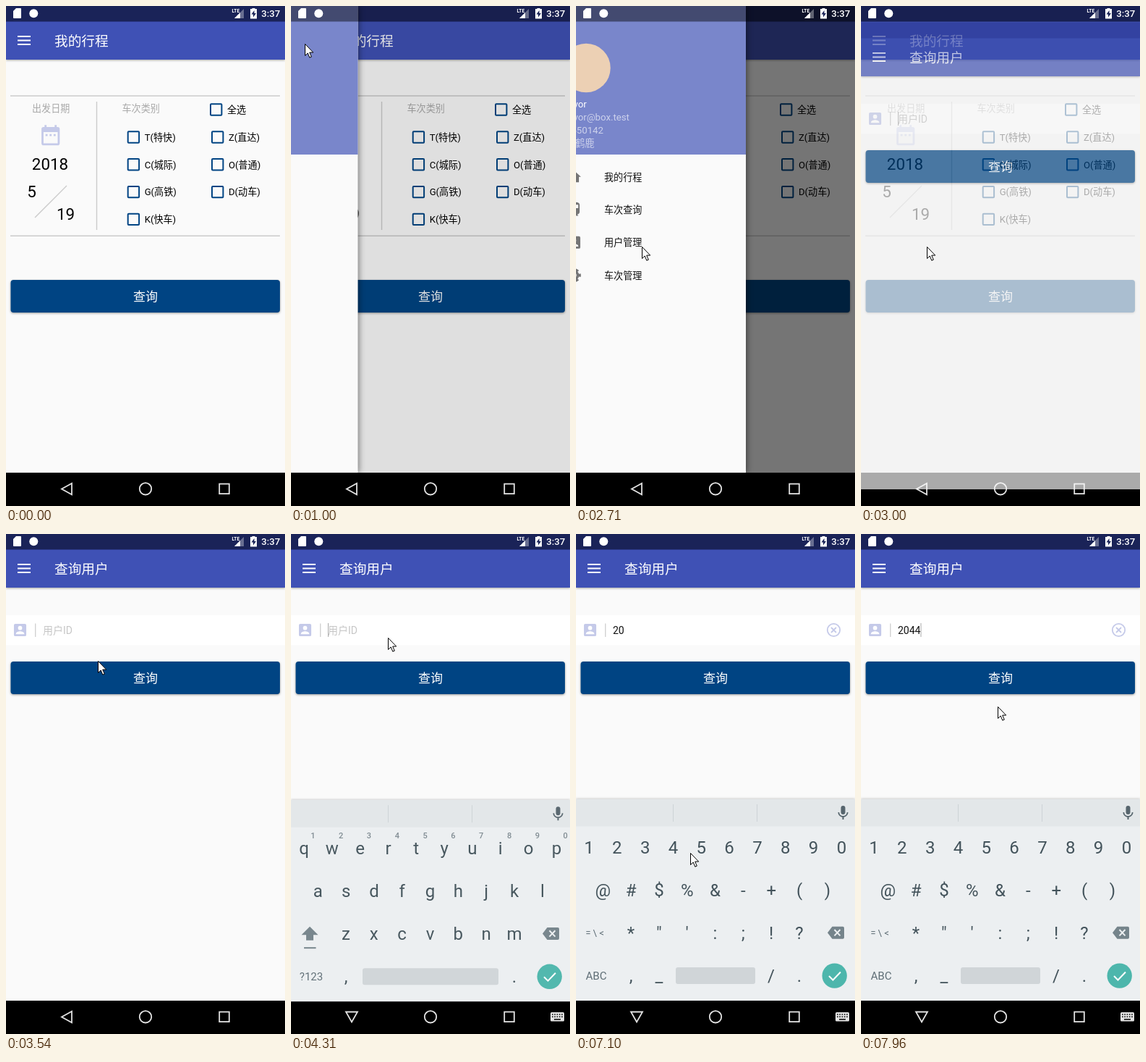
An HTML page that plays this animation: 386 px wide and 690 px high, repeating every 8 s.

```html
<!DOCTYPE html>
<html lang="zh-CN">
<head>
<meta charset="utf-8">
<style>
html, body { margin: 0; width: 100%; height: 100%; overflow: hidden; background: #000; }
svg { display: block; font-family: Roboto, "Noto Sans CJK SC", "Noto Sans CJK", "Noto Sans", sans-serif; }
.bar { filter: drop-shadow(0 1.5px 1.5px rgba(0,0,0,.35)); }
.btn { filter: drop-shadow(0 1px 1.5px rgba(0,0,0,.4)); }
.side { filter: drop-shadow(1px 0 4px rgba(0,0,0,.5)); }
.board { filter: drop-shadow(0 -1px 1.5px rgba(0,0,0,.18)); }
</style>
</head>
<body>
<script>
const esc = s => s.replace(/&/g, '&amp;').replace(/</g, '&lt;');
const text = (x, y, size, s, fill = '#000', anchor = 'start', extra = '') =>
  `<text x="${x}" y="${y}" font-size="${size}" fill="${fill}" text-anchor="${anchor}" ${extra}>${esc(s)}</text>`;
const mid = (x, y, size, s, fill, extra) => text(x, y, size, s, fill, 'middle', extra);
const rect = (x, y, w, h, fill, extra = '') =>
  `<rect x="${x}" y="${y}" width="${w}" height="${h}" fill="${fill}" ${extra}/>`;
const line = (d, stroke, width, extra = '') =>
  `<path d="${d}" fill="none" stroke="${stroke}" stroke-width="${width}" ${extra}/>`;
const group = (id, body, extra = '') => `<g id="${id}" ${extra}>${body}</g>`;
// 24-unit icon centred on a point
const icon = (cx, cy, scale, fill, body) =>
  `<g transform="translate(${cx} ${cy}) scale(${scale}) translate(-12 -12)" fill="${fill}">${body}</g>`;
const path = d => `<path d="${d}"/>`;

const ICONS = {
  home: path('M10 20v-6h4v6h5v-8h3L12 3 2 12h3v8z'),
  train: path('M4 15.5C4 17.43 5.57 19 7.5 19L6 20.5v.5h12v-.5L16.5 19c1.93 0 3.5-1.57 3.5-3.5V5c0-3.5-3.58-4-8-4s-8 .5-8 4v10.5zm8 1.5a2 2 0 1 1 0-4 2 2 0 0 1 0 4zm6-7H6V5h12v5z'),
  user: path('M3 5v14a2 2 0 0 0 2 2h14a2 2 0 0 0 2-2V5a2 2 0 0 0-2-2H5a2 2 0 0 0-2 2zm12 4a3 3 0 1 1-6 0 3 3 0 0 1 6 0zm-9 8c0-2 4-3.1 6-3.1s6 1.1 6 3.1v1H6v-1z'),
  gear: `<g fill="none" stroke="#757575"><circle cx="12" cy="12" r="5.4" stroke-width="3.8"/>
    <circle cx="12" cy="12" r="8.2" stroke-width="3.4" pathLength="12" stroke-dasharray="1" stroke-dashoffset=".5"/></g>`,
  date: path('M9 11H7v2h2zm4 0h-2v2h2zm4 0h-2v2h2zm2-7h-1V2h-2v2H8V2H6v2H5a2 2 0 0 0-2 2v14a2 2 0 0 0 2 2h14a2 2 0 0 0 2-2V6a2 2 0 0 0-2-2zm0 16H5V9h14z'),
  mic: path('M12 14a3 3 0 0 0 3-3V5a3 3 0 0 0-6 0v6a3 3 0 0 0 3 3zm5.3-3c0 3-2.54 5.1-5.3 5.1S6.7 14 6.7 11H5c0 3.41 2.72 6.23 6 6.72V21h2v-3.28c3.28-.48 6-3.3 6-6.72z'),
};

const PALE = '#c5cae9', RULE = '#cbcbcb', NAVY = '#004483', KEY = '#43535b', GREY = '#75848b';

const frame = title =>
  rect(0, 0, 386, 644, '#fafafa') +
  rect(0, 21, 386, 53, '#3f51b5', 'class="bar"') + rect(0, 0, 386, 21.5, '#303f9f') +
  line('M16 42h18M16 47.5h18M16 53h18', '#fff', 1.9) + text(67, 54.5, 18.7, title, '#fff');
const button = y =>
  rect(6.5, y, 372.5, 45, NAVY, 'rx="4" class="btn"') + mid(193, y + 29, 17, '查询', '#fff');
const check = (x, y, label) =>
  rect(x, y - 7.7, 15.4, 15.4, 'none', `rx="1" stroke="${NAVY}" stroke-width="2"`) +
  text(x + 23, y + 4.8, 13.1, label);

const tripPage = () => {
  const types = ['T(特快)', 'Z(直达)', 'C(城际)', 'O(普通)', 'G(高铁)', 'D(动车)', 'K(快车)'];
  return frame('我的行程') +
    line('M6 124H379M6 317.3H379M125.5 132V309M40 292L84 248', RULE, 1.4) +
    text(36, 145.8, 13.1, '出发日期', '#a9a9a9') + text(160.5, 145.8, 13.1, '车次类别', '#a9a9a9') +
    icon(61.7, 178.2, 1.4, PALE, ICONS.date) +
    mid(61, 226, 22.4, '2018') + text(29.3, 264.3, 22.4, '5') + text(70, 295.3, 22.4, '19') +
    check(283, 143, '全选') +
    types.map((s, i) => check(i % 2 ? 285 : 168.7, 181 + 37.8 * (i >> 1), s)).join('') +
    button(378);
};

const userPage = () => frame('查询用户') +
  rect(0, 112, 386, 41.5, '#fff') + icon(19.5, 132.5, .95, PALE, ICONS.user) +
  line('M40.7 123.5v18.5', '#cfcfcf', 1.3) +
  text(51, 138, 14, '', '#000', 'start', 'id="entry"') +
  rect(51, 123, 1, 19, '#aaa', 'id="caret"') +
  group('clear', `<circle cx="356.5" cy="132.5" r="8.7" fill="none" stroke="${PALE}" stroke-width="1.8"/>` +
    line('M353 129l7 7m0-7l-7 7', PALE, 1.8)) +
  button(176);

const drawer = () => {
  const items = [['home', '我的行程'], ['train', '车次查询'], ['user', '用户管理'], ['gear', '车次管理']];
  return rect(0, 0, 263, 644, '#fafafa', 'class="side"') + rect(0, 0, 263, 205, '#7986cb') +
    '<circle cx="42" cy="85.5" r="33.7" fill="#ecd0b4"/>' +
    ['nivor', 'nivor@box.test', '5550142', '松鹤鹿'].map((s, i) =>
      text(14, 140 + 18 * i, 13.2, s, i ? '#cdd2ec' : '#fff')).join('') +
    items.map(([name, s], i) => icon(25.4, 235.7 + 45.3 * i, .95, '#757575', ICONS[name]) +
      text(67, 240.6 + 45.3 * i, 13.1, s, '#111')).join('');
};

const row = (chars, x, r) => [...chars].map((c, i) =>
  mid(x + 38.82 * i, 440.5 + 59.2 * r, 24, c, KEY)).join('');
const space = (x, w) => rect(x, 598, w, 23, '#d0d5d8', 'rx="3"');

const letters = () =>
  row('qwertyuiop', 18, 0) + row('asdfghjkl', 37.3, 1) + row('zxcvbnm', 76, 2) +
  [...'1234567890'].map((c, i) => mid(30.3 + 38.82 * i, 419, 11, c, '#7d8990', 'font-weight="500"')).join('') +
  `<path d="M26 540.5L37.5 552H31v7.5H21V552H14.5z" fill="${GREY}"/>` + rect(18, 569, 16.5, 2, GREY) +
  mid(28, 615, 15, '?123', '#5f6e76') + space(99, 188);
const symbols = () =>
  row('1234567890', 18, 0) + row('@#$%&-+()', 37.3, 1) + row('*"\':;!?', 76, 2) +
  mid(115, 618, 24, '_', KEY) + mid(270, 618, 24, '/', KEY) +
  mid(26, 555, 13, '= \\ <', '#5f6e76') + mid(28, 615, 15, 'ABC', '#5f6e76') + space(138, 110);

const keyboard = () =>
  rect(0, 366, 386, 278, '#eceff1', 'class="board"') + rect(0, 366, 386, 37.5, '#e3e7e9') +
  line('M134.5 373v24M250.5 373v24', '#cdd3d6', 1) + icon(369.5, 385, 1, '#56656d', ICONS.mic) +
  group('letters', letters()) + group('symbols', symbols()) +
  mid(76, 618, 24, ',', KEY) + mid(309, 618, 24, '.', KEY) +
  `<path d="M348 550.2l6.5-8.5H369a2 2 0 0 1 2 2v13a2 2 0 0 1-2 2H354.500z" fill="${GREY}"/>` +
  line('M357.500 546l8 8.400m0-8.400l-8 8.400', '#eceff1', 2) +
  '<circle cx="357.700" cy="609.600" r="17.200" fill="#4db6ac"/>' + line('M350 610l5.500 5.500 10.500-11', '#fff', 2);

const navBar = () => rect(0, 644, 386, 46, '#000') +
  group('back', line('M91 658.700V674.300L77 666.500z', '#e2e2e2', 1.8)) +
  group('hide', line('M76 659.500H92L84 673.500z', '#e2e2e2', 1.8) +
    rect(359, 660, 19, 12.5, '#e2e2e2', 'rx="1.500"') +
    line('M361 663h15M361 666.300h15', '#000', 1.6, 'stroke-dasharray="1.600 1.700"') + line('M364 669.800h9', '#000', 1.5)) +
  '<circle cx="193" cy="666.300" r="8.200" fill="none" stroke="#e2e2e2" stroke-width="1.800"/>' +
  rect(295.2, 659.5, 13.6, 13.6, 'none', 'stroke="#e2e2e2" stroke-width="1.800"');

const statusBar = () => rect(0, 0, 386, 21.5, '#000', 'opacity=".45"') +
  '<path d="M14 3h6a1 1 0 0 1 1 1v12a1 1 0 0 1-1 1H11a1 1 0 0 1-1-1V7z" fill="#fff"/>' +
  '<circle cx="38.300" cy="10.300" r="6" fill="#fff"/>' +
  text(312.5, 9, 6.5, 'LTE', '#fff', 'start', 'font-weight="700"') +
  '<path d="M329 4v13H316z" fill="#fff" opacity=".35"/><path d="M324 9v8H316z" fill="#fff"/>' +
  '<path d="M340.500 4V3h4v1H347v13.500H338V4z" fill="#fff"/><path d="M343.500 6l-4 5.500h2.500v4l4-5.500h-2.500z" fill="#1a2357"/>' +
  text(379.3, 15, 13.2, '3:37', '#fff', 'end', 'font-weight="500"');

document.body.innerHTML = `<svg width="386" height="690" viewBox="0 0 386 690">` +
  navBar() + group('trip', tripPage()) + rect(0, 0, 386, 644, '#000', 'id="scrim"') +
  group('drawer', drawer()) + group('user', userPage()) + group('keyboard', keyboard()) + statusBar() +
  group('cursor', '<path d="M.5.500v16l3.700-3.500 2.600 6.200 2.500-1.100-2.600-6h5z" fill="#fff" stroke="#000"/>') + '</svg>';

const el = {};
document.querySelectorAll('[id]').forEach(e => el[e.id] = e);

const clamp = x => Math.min(1, Math.max(0, x));
const smooth = p => p * p * (3 - 2 * p);
const out = p => 1 - (1 - p) ** 3;

// keys: [time, value, value, ...]
function track(keys, t, ease) {
  const i = keys.findIndex(k => k[0] > t);
  if (i < 1) return (i ? keys[keys.length - 1] : keys[0]).slice(1);
  const a = keys[i - 1], b = keys[i], p = ease((t - a[0]) / (b[0] - a[0]));
  return a.slice(1).map((v, j) => v + (b[j + 1] - v) * p);
}

const CURSOR = [[70, 304, 634], [770, 19, 52], [1000, 19, 52], [1700, 105, 371], [2160, 105, 371],
  [2470, 91, 332], [3060, 91, 332], [3710, 134, 143], [4330, 134, 143], [4930, 12, 601], [5080, 12, 601],
  [5710, 40, 438], [5880, 40, 438], [6090, 344, 418], [6200, 371, 438], [6320, 371, 438], [6710, 280, 436],
  [7250, 130, 441], [7420, 130, 434], [7610, 130, 434], [7950, 189, 238]];
// drawer width, scrim opacity
const DRAWER = [[999, 0, 0], [1000, 91, .105], [1340, 263, .6], [2709, 263, .6], [2710, 235, .53],
  [2920, 235, .53], [2945, 0, .08], [3010, 0, .075], [3150, 0, 0]];
const TYPED = [[5860, '2'], [6250, '20'], [7420, '204'], [7600, '2044']];
const BLINK = [2930, 4060, ...TYPED.map(k => k[0])];

const show = (e, on) => e.style.display = on ? '' : 'none';
const place = (e, x, y, alpha = 1) => {
  show(e, alpha > 0);
  e.setAttribute('transform', `translate(${x} ${y})`);
  e.setAttribute('opacity', alpha);
};

function draw(t) {
  const [cx, cy] = track(CURSOR, t, smooth);
  place(el.cursor, Math.round(cx), Math.round(cy), t >= 70 ? 1 : 0);

  const [width, dim] = track(DRAWER, t, out);
  place(el.drawer, width - 263, 0, width > 0 ? 1 : 0);
  el.scrim.setAttribute('opacity', dim);

  const age = t - 2945;
  place(el.user, 0, 55 * (1 - clamp(age / 350)) ** 5, 1 - (1 - clamp(age / 200)) ** 3.5);

  const rest = (1 - clamp((t - 4210) / 200)) ** 5;
  place(el.keyboard, 0, 40 * rest, 1 - rest);
  show(el.letters, t < 5100);
  show(el.symbols, t >= 5100);
  show(el.back, t < 4040);
  show(el.hide, t >= 4040);

  const value = TYPED.filter(k => k[0] <= t).map(k => k[1]).pop() || '';
  el.entry.textContent = value || '用户ID';
  el.entry.setAttribute('fill', value ? '#111' : '#c6c6c6');
  show(el.clear, value);
  const since = t - (BLINK.filter(b => b <= t).pop() || 0);
  el.caret.setAttribute('x', 51 + 7.86 * value.length);
  show(el.caret, since % 1000 < 500);
}

const start = performance.now();
(function tick() {
  draw((performance.now() - start) % 8000);
  requestAnimationFrame(tick);
})();
</script>
</body>
</html>
```
